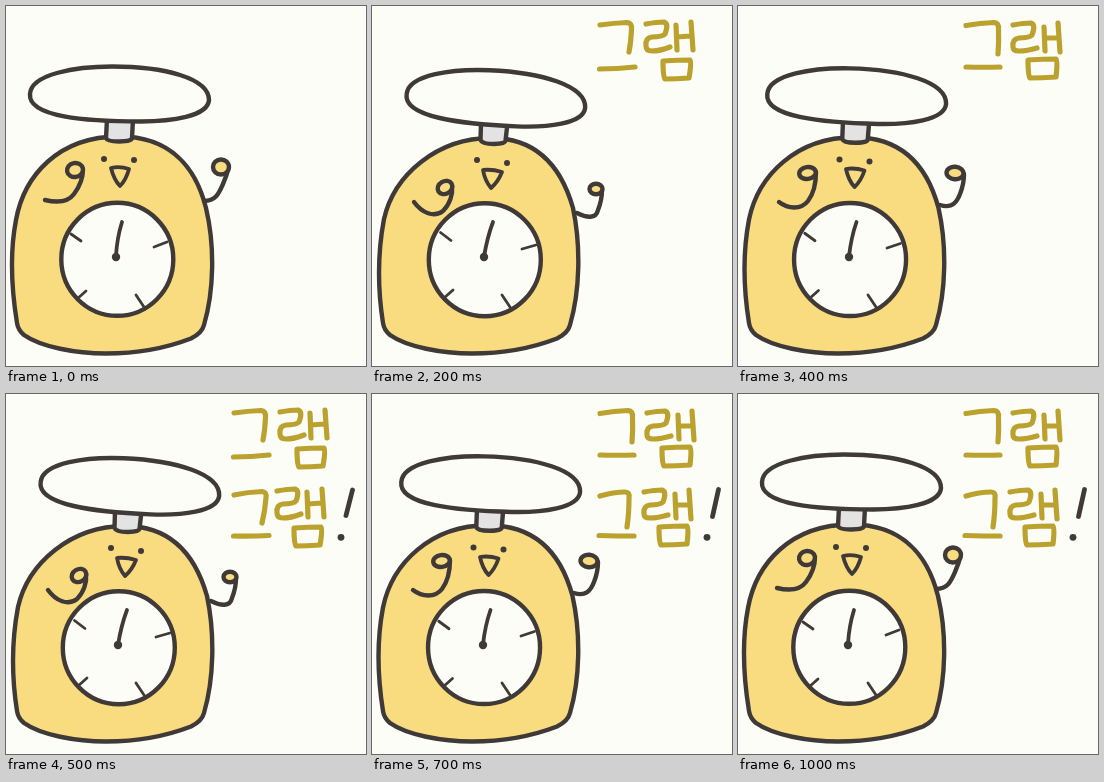
An HTML page for the animation above (1100 ms loop, 360 px wide and 360 px high).

```html
<!DOCTYPE html>
<html lang="ko">
<head>
<meta charset="utf-8">
<title>그램 그램!</title>
<style>
  html, body { margin: 0; width: 100%; height: 100%; overflow: hidden; background: #fdfdf8; }
  svg { display: block; width: 100vw; height: 100vh; }
  .ink { fill: none; stroke: #3f3a38; stroke-width: 4.4; stroke-linecap: round; stroke-linejoin: round; }
  .thin { stroke-width: 2.8; }
  .yellow { fill: #f9db80; }
  .white { fill: #fdfdf8; }
  .dot { fill: #3f3a38; }
  .gold { fill: none; stroke: #bba22f; stroke-width: 5.2; stroke-linecap: round; stroke-linejoin: round; }
</style>
</head>
<body>
<svg viewBox="0 0 360 360">
  <path id="body" class="ink yellow"/>
  <path id="neck" class="ink" style="fill:#e3e3e3"/>
  <path id="plate" class="ink white"/>
  <circle id="eyeL" class="dot" r="3"/>
  <circle id="eyeR" class="dot" r="3"/>
  <path id="mouth" class="ink" style="stroke-width:3.8"/>
  <ellipse id="dial" class="ink white" rx="56" ry="56.5"/>
  <path id="ticks" class="ink thin"/>
  <path id="needle" class="ink" style="stroke-width:3.8"/>
  <circle id="hub" class="dot" r="4.2"/>
  <path id="armL" class="ink"/>
  <path id="armR" class="ink"/>
  <ellipse id="fistL" class="ink yellow"/>
  <ellipse id="fistR" class="ink yellow"/>
  <g id="line1" class="gold">
    <path id="geu1"/>
    <path id="raem1"/>
  </g>
  <g id="line2">
    <path id="geu2" class="gold"/>
    <path id="raem2" class="gold" transform="translate(-3 79)"/>
    <path id="bang" class="ink" style="stroke-width:4.8"/>
    <circle class="dot" cx="335" cy="143.3" r="3.4"/>
  </g>
</svg>
<script>
const STEP = 100, STEPS = 11;
const $ = id => document.getElementById(id);
const set = (id, attrs) => {
  for (const name in attrs) $(id).setAttribute(name, attrs[name]);
};
const mix = (a, b, t) => a + (b - a) * t;

// Blends two paths that share the same commands.
function blend([from, to], t) {
  const ends = to.match(/-?[\d.]+/g);
  let i = 0;
  return from.replace(/-?[\d.]+/g, n => mix(+n, +ends[i++], t));
}

// Each pair: leaning left, leaning right.
const shapes = {
  body: [
    'M11 317C5 280 4 245 10 214C18 170 52 130.5 113 130.5C165 130.5 190 162 200 202C209 240 208 285 198 319Q196 327 185 332.5C150 346 120 347.5 100 347.5C70 347.5 35 341 18 329Q12 324 11 317Z',
    'M11 317C6 285 5 250 12 213C22 169 65 132 119 132C165 132 189 160 201 202C209 240 208 285 198 319Q196 327 185 332.5C150 346 120 347.5 100 347.5C70 347.5 35 341 18 329Q12 324 11 317Z'],
  neck: [
    'M101 113L100 132Q101 135.5 113 135.5Q126 135.5 126 132L127 113',
    'M109 117L108.5 134Q110 138 122 138Q133 138 133.5 135L135.5 117'],
  mouth: [
    'M105 162Q114 160 123 163Q120 174 114 180Q108 174 105 162Z',
    'M111 164Q120 163 130 166Q126 176 119 182Q113 175 111 164Z'],
  ticks: [
    'M65 228L75 235M148 241L161 236M80 285L71 293M130 289L138 301',
    'M68.5 226.5L79 234.5M150 243L164 239M81 284L72 292M130 289L138 301'],
  needle: ['M110 250Q111 232 116 216', 'M112 251Q115 232 121 216']
};

const arms = [
  { armL: 'M39 194Q60 199 68 188Q77 176 77 163',
    armR: 'M198 195C210 195 213 187 217 178Q221 169 223 160',
    fistL: [69, 164, 8, 7, -10], fistR: [215, 161, 8, 7.5, 0] },
  { armL: 'M41 196C50 203 63 204 70 195C76 187 78 175 78 166',
    armR: 'M202 199C214 203 219 196 222 188Q226 178 226 168',
    fistL: [69.5, 167, 8.3, 6, -8], fistR: [217, 167, 8.5, 6.3, 5] },
  { armL: 'M42 196C50 207 62 212 71 205C78 198 81 188 80 180',
    armR: 'M205 207C215 212 224 213 226 204Q230 194 230 184',
    fistL: [73, 181.5, 7.6, 6.3, -30], fistR: [224, 183, 6.5, 5.3, 0] }
];

// Each pair: the two extreme drawings of the wobbling lettering.
const raem = [
  'M274 18Q285 16 292 16Q297 18 293 28Q290 31 280 31Q273 32 274 40Q274 45 280 45Q288 45 298 41' +
  'M304 19L305 44M305 31L318 30M319 16L321 44M291 55Q305 54 318 54Q320 55 317 72Q304 73 293 73Q291 72 291 55Z',
  'M275 19Q286 17 293 17Q298 19 294 29Q291 32 281 32Q274 33 275 41Q275 45 281 45Q289 45 299 42' +
  'M306 21L307 45M307 32L320 32M320 17L322 46M290 54Q305 53 318 53Q320 54 318 71Q304 72 292 72Q290 71 290 54Z'
];
const lettering = {
  geu1: ['M228 19Q242 17 255 16.5Q260 17 259.5 23Q259 36 257 46M227.5 63Q245 63 263 61',
         'M228 19.5Q242 17 256 16.5Q261 17 260.5 23Q261 36 260 48M228 61Q245 61.5 262 61'],
  geu2: ['M228 101Q242 98 256 97.5Q261 98 260 104Q259 117 256 129M227.5 142Q245 142.5 263 141.5',
         'M228 102Q242 98 253 98Q258 98 257 104Q257 120 255 133M227 141.5Q245 142 262 142'],
  raem1: raem,
  raem2: raem,
  bang: ['M346.5 96L340 121.5', 'M346.5 95.5L340.5 122.5']
};

function draw(ms) {
  const step = Math.floor(ms / STEP) % STEPS;
  const pose = step < 8 ? step % 3 : 0;
  const lean = pose / 2;

  for (const id in shapes) set(id, { d: blend(shapes[id], lean) });
  set('plate', {
    d: 'M24 88C25 68 70 60.5 106 60.5C158 60.5 203 72 203 94C202 110.5 165 115.5 135 115.5C80 115.5 22 111 24 88Z',
    transform: `translate(${10.5 * lean} ${4 * lean}) rotate(${2.4 * lean} 114 88)`
  });
  set('eyeL', { cx: mix(98, 105, lean), cy: mix(153, 154, lean) });
  set('eyeR', { cx: mix(128, 135, lean), cy: mix(154, 157, lean) });
  set('dial', { cx: mix(111.3, 112.8, lean), cy: mix(253.3, 253.7, lean) });
  set('hub', { cx: mix(110, 112, lean), cy: 251 });

  const arm = arms[pose];
  for (const side of ['L', 'R']) {
    const [cx, cy, rx, ry, turn] = arm['fist' + side];
    set('arm' + side, { d: arm['arm' + side] });
    set('fist' + side, { cx, cy, rx, ry, transform: `rotate(${turn} ${cx} ${cy})` });
  }

  // The lettering cycles through three drawings.
  const wobble = [0.5, 1, 0][step % 3];
  for (const id in lettering) set(id, { d: blend(lettering[id], wobble) });
  set('line1', { visibility: step < 2 ? 'hidden' : 'visible' });
  set('line2', { visibility: step < 5 ? 'hidden' : 'visible' });
}

const start = performance.now();
function tick() {
  draw(performance.now() - start);
  requestAnimationFrame(tick);
}
tick();
</script>
</body>
</html>
```
